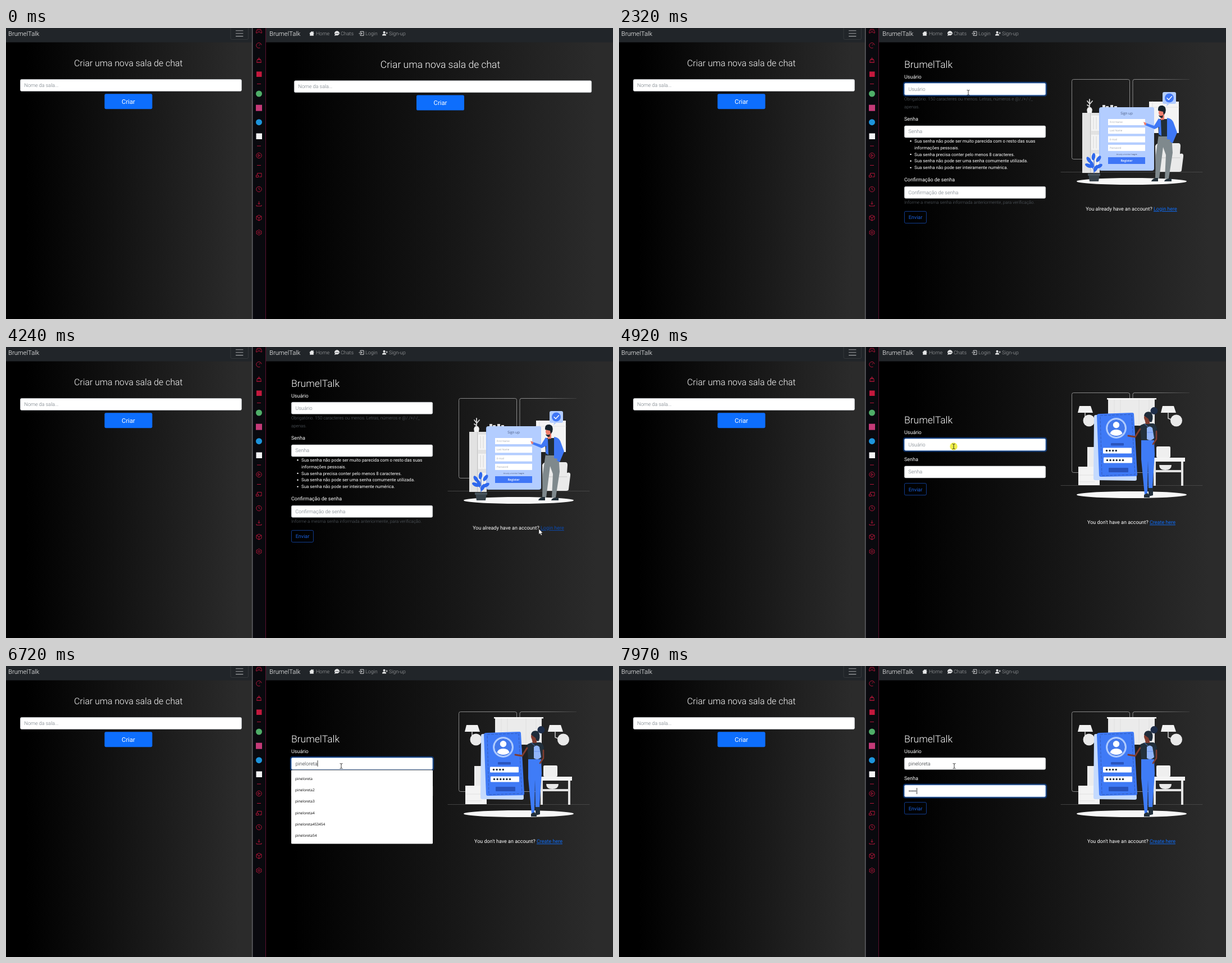
Animation, 1081 px wide and 518 px high, one loop 8 s. Source, as an HTML page:

```html
<!DOCTYPE html>
<html lang="pt">
<head>
<meta charset="utf-8">
<title>BrumelTalk</title>
<style>
  html, body { margin: 0; width: 100%; height: 100%; overflow: hidden; background: #000; }
  svg { display: block; width: 100%; height: 100%; }
  text { font: 400 9px Roboto, sans-serif; fill: #fff; text-rendering: geometricPrecision; white-space: pre; }
  .h, .ph, .val, .help { font-weight: 300; }
  .ph { fill: #6c757d; }
  .val { fill: #212529; }
  .help { font-size: 7.88px; fill: #5a6168; }
  .li { font-size: 7.88px; }
  .brand { font-size: 11.26px; }
  .nav { fill: #a6a8aa; font-weight: 300; }
  .mid { text-anchor: middle; }
  .big { font-size: 11.26px; text-anchor: middle; }
  .out { fill: #1b62e0; text-anchor: middle; }
  .link { fill: #0d6efd; text-decoration: underline; }
  .opt { font: 500 6.5px "Open Sans", sans-serif; fill: #000; }
  .art text { font-family: "Open Sans", sans-serif; }
  .side { fill: none; stroke: #c4183d; stroke-width: .9; stroke-linejoin: round; }
</style>
</head>
<body>
<svg id="stage" viewBox="0 0 1081 518" preserveAspectRatio="none"></svg>
<script>
const LOOP = 8000;
const APP = "BrumelTalk", USER = "pineloreta";
const stage = document.getElementById("stage");

// ---- markup helpers ----
const rect = (x, y, w, h, fill, r = 0, more = "") =>
  `<rect x="${x}" y="${y}" width="${w}" height="${h}" rx="${r}" fill="${fill}" ${more}/>`;
const circ = (x, y, r, fill, more = "") => `<circle cx="${x}" cy="${y}" r="${r}" fill="${fill}" ${more}/>`;
const oval = (x, y, rx, ry, fill, more = "") => `<ellipse cx="${x}" cy="${y}" rx="${rx}" ry="${ry}" fill="${fill}" ${more}/>`;
const path = (d, fill = "none", more = "") => `<path d="${d}" fill="${fill}" ${more}/>`;
const line = (d, color, w = 1) => path(d, "none", `stroke="${color}" stroke-width="${w}" stroke-linecap="round" stroke-linejoin="round"`);
const text = (x, y, s, cls = "", more = "") => `<text x="${x}" y="${y}" class="${cls}" ${more}>${s}</text>`;
const group = (id, body, more = "") => `<g id="${id}" ${more}>${body}</g>`;

const field = (x, y, w, hint, id = "") =>
  rect(x + .3, y + .3, w - .6, 20.9, "#fff", 2.2, 'stroke="#ced4da" stroke-width=".6"') +
  (id ? group(id + "Ring",
    rect(x - 1.1, y - 1.1, w + 2.2, 23.7, "none", 3.2, 'stroke="#0d6efd" stroke-width="2.2" stroke-opacity=".38"') +
    rect(x + .3, y + .3, w - .6, 20.9, "none", 2.2, 'stroke="#86b7fe" stroke-width=".6"')) : "") +
  text(x + 7.3, y + 13.6, hint, "ph", id && `id="${id}Hint"`);
const send = y =>
  rect(508.4, y, 39, 21, "none", 2.2, 'stroke="#164fb8" stroke-width=".8"') + text(528, y + 13.8, "Enviar", "out");
const heading = (x, y, s, size, cls = "h") => text(x, y, s, cls, `style="font-size:${size}px"`);

// ---- room form ----
const room = (x, y, w, mid, size) =>
  heading(mid, y - 23, "Criar uma nova sala de chat", size, "h mid") +
  field(x, y, w, "Nome da sala...") +
  rect(mid - 42.5, y + 26, 85, 27, "#0d6efd", 2.6) + text(mid, y + 43.8, "Criar", "big");

// ---- side bar ----
function sideBar() {
  const at = (y, d) => path(d, "none", `transform="translate(450.5 ${y})"`);
  const dash = y => at(y, "M-3.5 0h7");
  const ring = "M-4.7 0a4.7 4.7 0 1 0 9.4 0a4.7 4.7 0 1 0-9.4 0";
  return rect(438, 0, 25, 518, "#09090e") + rect(438.3, 0, 1, 518, "#8e8e92") + rect(462, 0, 1, 518, "#5c1230") +
    `<g class="side">` +
    at(5.5, "M-3-3.2h6q2 3 2 6.5q-2 1-3.4-1.8h-3.2q-1.4 2.8-3.4 1.8q0-3.5 2-6.5zM-2.5-.8h1.5M1-.8h1.5") +
    at(31, "M2 4.3a4.7 4.7 0 1 1 2.6-5M0 0l2.5-2.5") +
    at(57, "M-4 4.5h8l-.8-5h-6.4zM-2-.5v-1.5h4v1.5M0-2v-2.5M-1.5 4.5v-2M1.5 4.5v-2") +
    dash(99.5) + dash(210) + dash(244.5) +
    at(227, ring + "M-1.5-2.2l3.6 2.2l-3.6 2.2z") +
    at(262, "M-3-.5v-3h7.5v6.5h-4M-5 0h4v3.5h-4z") +
    at(287, ring + "M0-3v3l2 1.5") +
    at(313, "M0-4.5v5.5M-2-1l2 2l2-2M-4.5 2v2h9v-2") +
    at(338, "M0-5l4.5 2.3v5.2l-4.5 2.5l-4.5-2.5v-5.2zM-4.5-2.7l4.5 2.3l4.5-2.3M0-.4v5.4") +
    at(364, "M0-5l1.8 1.6l2.5.9v5l-2.5.9l-1.8 1.6l-1.8-1.6l-2.5-.9v-5l2.5-.9z") +
    circ(450.5, 364, 1.7, "none") + `</g>` +
    rect(446, 77.5, 9.5, 9.5, "#c4183d") + circ(450.5, 117, 5.5, "#4fae68") +
    rect(445, 136.7, 11, 11, "#c43a78") + circ(450.5, 167.7, 5.5, "#1d94dc") + rect(445.5, 187.5, 10.5, 10.5, "#f2f2f4");
}

// ---- nav bars ----
function navBars() {
  const w = "#e6e7e8";
  return rect(0, 0, 438, 25.5, "#212529") + rect(463, 0, 618, 25.5, "#212529") +
    text(4, 13.8, APP, "brand h") + text(469, 14, APP, "brand h") +
    rect(400, -4, 31.5, 24.5, "none", 2.5, 'stroke="#3a3d41" stroke-width=".8"') +
    line("M409.5 4.8h12.5M409.5 9.7h12.5M409.5 14.6h12.5", "#a2a4a6", 1.1) +
    path("M540 9.8l4.5-4l4.5 4h-1.2v4h-6.6v-4z", w) + rect(546.3, 6, 1.3, 2.5, w) +
    path("M585 14l.9-2.4a4.5 3.9 0 1 1 2 1.3z", w) + [587.5, 589.5, 591.5].map(x => circ(x, 9.7, .7, "#212529")).join("") +
    line("M631 8v-1.8h6v7.2h-6v-1.8M628.8 9.8h5.2M632.5 8.2l1.6 1.6l-1.6 1.6", w, .9) +
    circ(673.5, 7.8, 2, w) + path("M670 13.5q0-3.2 3.5-3.2t3.5 3.2z", w) + line("M678 7.5v3M676.5 9h3", w, .8) +
    [["Home", 552], ["Chats", 596], ["Login", 640]].map(([s, x]) => text(x, 13, s, "nav")).join("") +
    text(682, 13, "Sign-up", "nav", 'id="signNav"');
}

// ---- illustrations ----
const backdrop = y =>
  rect(806.5, y, 103, 142, "none", 3, 'stroke="#c4c4c4" stroke-width=".65"') +
  path(`M1016 ${y}H918q-3 0-3 3v136q0 3 3 3h35`, "none", 'stroke="url(#fadeLine)" stroke-width=".65"') +
  line(`M787 ${y + 165}H1039`, "#4d4d4d", .8) +
  oval(913, y + 181.5, 98, 6, "#f7f7f7");

function signArt() {
  const names = ["First Name", "Last Name", "E-mail", "Password"];
  const leaf = (x, y, a) => oval(x, y, 3.2, 6.5, "#2f68ec", `transform="rotate(${a} ${x} ${y})"`);
  return backdrop(91.5) +
    // shelf and vase
    rect(825, 151, 31, 107, "#e2e2e2") + rect(839, 151, 1, 107, "#c4c4c4") +
    [156, 190, 224].map(y => rect(841, y, 14, 27, "#f3f3f3") + line(`M845 ${y + 3}v21M850 ${y + 3}v21`, "#cdcdcd", .8)).join("") +
    [861, 867, 875, 882].map((x, i) => rect(x, 137 + i % 2 * 2, 5, 8, "#dcdcdc")).join("") +
    path("M834 151q-2-8 2-10h4q4 2 2 10z", "#f4f4f4") + line("M838 141v-14M838 135l-4-5M838 136l5-6M838 140l-4-3", "#d5d5d5", 1.8) +
    // wall picture and armchair
    rect(944, 131, 53, 56, "#f4f4f4") + line("M944 141h53M950 131v56", "#dedede", .8) +
    path("M955 210q2-5 8-5h33q4 0 4 5l-1 14q7-2 6 5l-3 24q0 3-4 3h-42z", "#eaeaea") + line("M957 231h42", "#c9c9c9", 1) +
    // form card
    rect(855, 141, 98, 113, "#a7c4fb", 4) + rect(857, 141, 96, 112, "#b3cdff", 4) +
    text(904, 154, "Sign up", "mid", 'style="font-size:6.3px;fill:#47597f"') +
    names.map((s, i) => {
      const y = 162 + 15.3 * i;
      return rect(871, y, 66, 11, "#fff") + text(874, y + 7, s, "", 'style="font-size:4.5px;fill:#9aa0ac"');
    }).join("") +
    text(904, 226, 'Already a member? <tspan font-weight="700">Log in</tspan>', "mid", 'style="font-size:3px;fill:#3d4c70"') +
    rect(871, 230, 66, 12, "#3f76f6") + text(904, 238, "Register", "mid", 'style="font-size:5.4px;font-weight:600"') +
    // plant
    line("M846 262V230M846 252l-10-9M846 254l9-10", "#2454c4", 1) +
    leaf(845, 229, 8) + leaf(837, 235, -35) + leaf(854, 233, 35) + leaf(836, 245, -65) + leaf(855, 246, 60) + leaf(842, 243, -15) + leaf(849, 250, 25) +
    path("M836 260h20l-2 13h-16z", "#38434b") + rect(835, 259, 22, 4, "#48545c") +
    // bubble
    path("M971 114h18q3 0 3 3v15q0 3-3 3h-9l-5 4l1-4h-5q-3 0-3-3v-15q0-3 3-3z", "#b3cdff") +
    circ(980, 124.5, 8, "#3f76f6") + line("M976 124.8l3 3l5.5-6", "#fff", 1.4) +
    // man
    path("M961 190h23l2 32l-7 46h-7l2-42l-5-14l-7 56h-7l1-42z", "#7f898d") +
    path("M948 273q1-4 7-6h5v6zM971 273q1-4 7-5h6v5z", "#24313a") +
    path("M960 162h17l3 31h-19z", "#222f38") +
    path("M961 161l-8 13l-15-5l-1 4l17 7l8-4l-1 13l5 3l-1-28zM976 160q8 1 11 7l7 19l-8 19l-5-3l5-15l-3 12l-7-1z", "#3f78f6") +
    path("M939 169l-5-2l2 6l3-1zM964 155h7v8l-6 1z", "#ee7d6c") + oval(966.5, 150.5, 5.5, 7, "#ee7d6c") +
    path("M960 147q-1-10 8-9q8 2 5 13l-3 4l-1-6z", "#17232b") + path("M961 155q4 3 8 0l-1 5q-6 0-7-5z", "#17232b");
}

function loginArt() {
  const lamp = (x, y, reach) => path(`M${x} ${y}h20l4 12h-27z`, "#f1f1f1") +
    line(`M${x + 10} ${y + 12}v10l${reach} 6`, "#cfcfcf", 1.5) + circ(x + 10 + reach, y + 26, 10.5, "#e9e9e9");
  const dots = (x, y, n) => Array.from({ length: n }, (_, i) => circ(x + 5.6 * i, y, 1.7, "#1d2a38")).join("");
  return backdrop(81.5) +
    // window and lamps
    rect(871, 92, 83, 48, "#ebebeb") + rect(869, 91, 88, 2.5, "#f8f8f8") +
    line("M882 94v46M893 94v46M926 94v46M944 94v46", "#dcdcdc", .8) + lamp(820, 105, 7) + lamp(968, 105, 14.5) +
    // bookcase
    rect(834, 178, 22, 40, "#ececec") + rect(818, 213, 38, 33, "#f3f3f3") + line("M819 228h28M819 240h28", "#dadada", .8) +
    // desk
    rect(957, 177, 25, 20, "#efefef", 2) + rect(949, 197, 59, 7, "#f5f5f5") + rect(952, 204, 4, 43, "#e4e4e4") + rect(1001, 204, 4, 43, "#e4e4e4") +
    path("M962 210h22q0 9-11 9t-11-9z", "#e9e9e9") + rect(953, 219, 50, 4, "#e2e2e2") +
    // phone
    path("M849 121l65-4q3 0 3 3l5 115q0 3-3 3l-71-1q-3 0-3-3l1-110q0-3 3-3z", "#c4dafe") +
    path("M855 119l59-2q3 0 3 3l6 107q0 3-3 3l-62 1q-3 0-3-3l-4-105q0-4 4-4z", "#3f7af6") +
    path("M857 122l56-2l6 107l-59 2z", "none", 'stroke="#2b51a8" stroke-width=".7" stroke-dasharray="5 2"') +
    circ(885.5, 144.5, 18.5, "#a9c8ff") + circ(885.5, 144.5, 16, "#4379ec", 'stroke="#e4eeff" stroke-width=".8"') +
    circ(885.5, 138.8, 5.7, "#fff") + path("M874.5 154q2-7 11-7t11 7q-4.500 4-11 4t-11-4z", "#fff") +
    rect(876, 171, 23, 4.5, "#2954bd", 1) +
    rect(862, 179.5, 51, 10, "#fff", 1) + dots(868.5, 184.5, 4) +
    rect(863, 196.5, 51, 10, "#fff", 1) + dots(869.5, 201.5, 6) + rect(872, 215, 35, 8, "#2954bd", 1) +
    // woman
    path("M930 165h23l1 26l-4 61h-7l-1-50l-1 60h-5l-6-62z", "#3f7cf7") +
    path("M935 263l6-3l4 5v3h-10zM943 251h8v13l-8 2z", "#22303c") +
    path("M928 140q6-4 12-4h12q5 3 6 10l-4 20h-24z", "#22303c") +
    line("M928 146l-9 14l-12-2", "#813d30", 3) + line("M957 150v14l-6 9", "#813d30", 2.6) +
    path("M936 128h9v9h-7z", "#813d30") + oval(940, 125, 5, 7, "#813d30") +
    path("M935 122q2-9 12-6q6 6 2 17q-4 3-6-5z", "#1f2c3a") + circ(953, 113.5, 6.5, "#1d2d49") +
    path("M940 144q5-5 10 0l3 18q-6 7-13 2z", "#91b5fa") + line("M941 152h10M942 142l-6-5", "#5d8cec", .8);
}

// ---- pages ----
const rules = ["Sua senha não pode ser muito parecida com o resto das suas", "informações pessoais.",
  "Sua senha precisa conter pelo menos 8 caracteres.", "Sua senha não pode ser uma senha comumente utilizada.",
  "Sua senha não pode ser inteiramente numérica."];

const signPage = heading(508, 70.8, APP, 17.5) +
  text(508, 89.5, "Usuário") + field(508, 98, 252, "Usuário", "sign") +
  text(508, 129.3, "Obrigatório. 150 caracteres ou menos. Letras, números e @/./+/-/_", "help") + text(508, 142.6, "apenas.", "help") +
  text(508, 165.2, "Senha") + field(508, 173.8, 252, "Senha") +
  rules.map((s, i) => text(526, 203.8 + 11.85 * i, s, "li") + (i === 1 ? "" : circ(519.5, 201.2 + 11.85 * i, 1.2, "#fff"))).join("") +
  text(508, 273.3, "Confirmação de senha") + field(508, 282, 252, "Confirmação de senha") +
  text(508, 313, "Informe a mesma senha informada anteriormente, para verificação.", "help") + send(326.4) +
  group("signArt", signArt(), 'class="art"') +
  text(912.5, 0, 'You already have an account? <tspan id="signHere" class="link">Login here</tspan>', "mid", 'id="signLink"');

const loginPage = heading(508, 135.8, APP, 17.5) +
  text(508, 154.6, "Usuário") + field(508, 163, 252, "Usuário", "user") + text(515.5, 176.6, "", "val", 'id="userText"') +
  text(508, 203.2, "Senha") + field(508, 211.7, 252, "Senha", "pass") +
  group("passDots", Array.from({ length: 5 }, (_, i) => circ(517.2 + 2.75 * i, 222.5, .95, "#212529")).join("")) + send(242.7) +
  group("menu", rect(508, 185, 252, 131.5, "#fff", 1.5) + rect(508, 184.7, 252, .7, "#25282c") +
    ["", 2, 3, 4, 453454, 54].map((n, i) => text(515, 202.7 + 20.35 * i, USER + n, "opt")).join("")) +
  group("loginArt", loginArt(), 'class="art"') +
  text(912.5, 0, 'You don\'t have an account? <tspan class="link">Create here</tspan>', "mid", 'id="loginLink"');

const pointers =
  group("arrow", path("M0 0v9.5l2.2-2l1.6 3.7l1.7-.8l-1.6-3.5h3z", "#fff", 'stroke="#222" stroke-width=".5"')) +
  group("hand", path("M-1 1q0-1.5 1.1-1.5t1.1 1.5v3.5l4 1q1.3.4 1.1 2l-.8 4.5h-5.5l-3.3-4.5q-.6-1.5 1-1.3l1.3 1.3z", "#fff", 'stroke="#222" stroke-width=".5"')) +
  group("beam", line("M-2-4.5q2 0 2 1v7q0 1-2 1M2-4.5q-2 0-2 1M0 3.5q0 1 2 1", "#222", .9));

const shade = (id, x1, x2) =>
  `<linearGradient id="${id}" gradientUnits="userSpaceOnUse" x1="${x1}" x2="${x2}" y1="0" y2="0"><stop offset=".08" stop-color="#000"/><stop offset=".95" stop-color="#2b2b2b"/></linearGradient>`;

stage.innerHTML = `<defs>${shade("leftBg", 0, 438)}${shade("rightBg", 463, 1081)}
  <linearGradient id="fadeLine" gradientUnits="userSpaceOnUse" x1="915" x2="1016" y1="0" y2="0"><stop offset=".3" stop-color="#c4c4c4"/><stop offset="1" stop-color="#444"/></linearGradient></defs>` +
  rect(0, 0, 438, 518, "url(#leftBg)") + rect(463, 0, 618, 518, "url(#rightBg)") +
  navBars() + room(25.2, 91.2, 394.6, 218, 15.88) +
  group("roomPage", room(513, 93.5, 530, 773.5, 17.5)) + group("signPage", signPage) + group("loginPage", loginPage) +
  rect(0, 0, .8, 11, "#111", 0, 'id="caret"') + sideBar() +
  group("cursor", circ(0, 0, 6.7, "#ecec2c", 'id="glow" opacity=".85"') + pointers);

// ---- motion ----
const el = {};
stage.querySelectorAll("[id]").forEach(n => el[n.id] = n);
const show = (id, on) => el[id].style.display = on ? "" : "none";
const within = (t, a, b) => t >= a && t < b;
const clamp = v => Math.max(0, Math.min(1, v));
const ringAt = (t, on, off) => clamp((t - on) / 150) * (1 - clamp((t - off) / 100));

const stops = [[200, 1006, 520], [830, 685, 18], [1440, 685, 18], [1840, 676, 70], [2070, 622, 115], [2330, 622, 115],
  [2760, 848, 346], [3010, 786, 342], [3480, 962, 321], [3770, 956, 322], [4100, 956, 322], [4230, 949, 324],
  [4320, 949, 324], [4600, 745, 285], [4850, 596, 177], [6460, 596, 177], [6600, 597, 178]];
const keys = [5590, 5720, 6120, 6200, 6320, 6460, 6530, 6590, 6660, 6720];
const dotKeys = [7450, 7580, 7710, 7840, 7970];
const clicks = [1100, 2190, 4010, 4870];
const pressed = (list, t) => list.filter(k => t >= k).length;

function cursorAt(t) {
  const i = stops.findIndex(s => s[0] > t);
  if (i < 0) return stops[stops.length - 1].slice(1);
  if (i === 0) return stops[0].slice(1);
  const [t0, x0, y0] = stops[i - 1], [t1, x1, y1] = stops[i];
  const u = (t - t0) / (t1 - t0), e = u * u * (3 - 2 * u);
  return [x0 + (x1 - x0) * e, y0 + (y1 - y0) * e];
}

function pointerKind(x, y, page) {
  const over = (l, top, r, b) => within(x, l, r) && within(y, top, b);
  if (over(669, 4, 714, 21)) return "hand";
  if (page === "signPage") {
    if (over(952, 316, 994, 328)) return "hand";
    if (over(508, 98, 760, 120) || over(508, 174, 760, 195) || over(508, 282, 760, 303)) return "beam";
  }
  if (page === "loginPage" && (over(508, 163, 760, 185) || over(508, 212, 760, 233))) return "beam";
  return "arrow";
}

function placeCaret(x, y, on) {
  show("caret", on);
  el.caret.setAttribute("x", x);
  el.caret.setAttribute("y", y);
}

function draw(t) {
  const page = t < 1370 ? "roomPage" : t < 4310 ? "signPage" : "loginPage";
  ["roomPage", "signPage", "loginPage"].forEach(p => show(p, p === page));

  // links sit higher until the picture above them has loaded
  const signLoaded = t >= 1480, loginLoaded = t >= 4450;
  show("signArt", signLoaded);
  show("loginArt", loginLoaded);
  el.signLink.setAttribute("y", signLoaded ? 325 : 206);
  el.loginLink.setAttribute("y", loginLoaded ? 315.3 : 196.3);
  el.signHere.style.fill = within(t, 3480, 4310) ? "#0a4bb4" : "";
  el.signNav.style.fill = within(t, 780, 1500) ? "#c6c8c9" : "";

  el.signRing.style.opacity = ringAt(t, 1370, 2760);
  el.userRing.style.opacity = ringAt(t, 4310, 6990);
  el.passRing.style.opacity = ringAt(t, 6990, LOOP);

  const typed = USER.slice(0, pressed(keys, t)), dots = pressed(dotKeys, t);
  el.userText.textContent = typed;
  show("userHint", !typed);
  show("passHint", !dots);
  [...el.passDots.children].forEach((d, i) => d.style.display = i < dots ? "" : "none");
  show("menu", within(t, 5040, 7040));

  if (page === "roomPage") show("caret", false);
  else if (page === "signPage") placeCaret(515.4, 103.5, t < 2760 && (t - 1370) % 1000 < 500);
  else if (t < 6990) placeCaret(515.6 + (typed ? el.userText.getComputedTextLength() : 0), 168, within(t, 4990, 5390) || t >= 5590);
  else placeCaret(dots ? 516.2 + 2.8 * dots : 515.6, 217, true);

  const [x, y] = cursorAt(t), kind = pointerKind(x, y, page);
  show("cursor", t >= 200);
  el.cursor.setAttribute("transform", `translate(${x} ${y})`);
  ["arrow", "hand", "beam"].forEach(k => show(k, k === kind));
  show("glow", clicks.some(c => within(t, c, c + 120)));
}

const start = performance.now();
function tick() {
  draw((performance.now() - start) % LOOP);
  requestAnimationFrame(tick);
}
tick();
</script>
</body>
</html>
```
